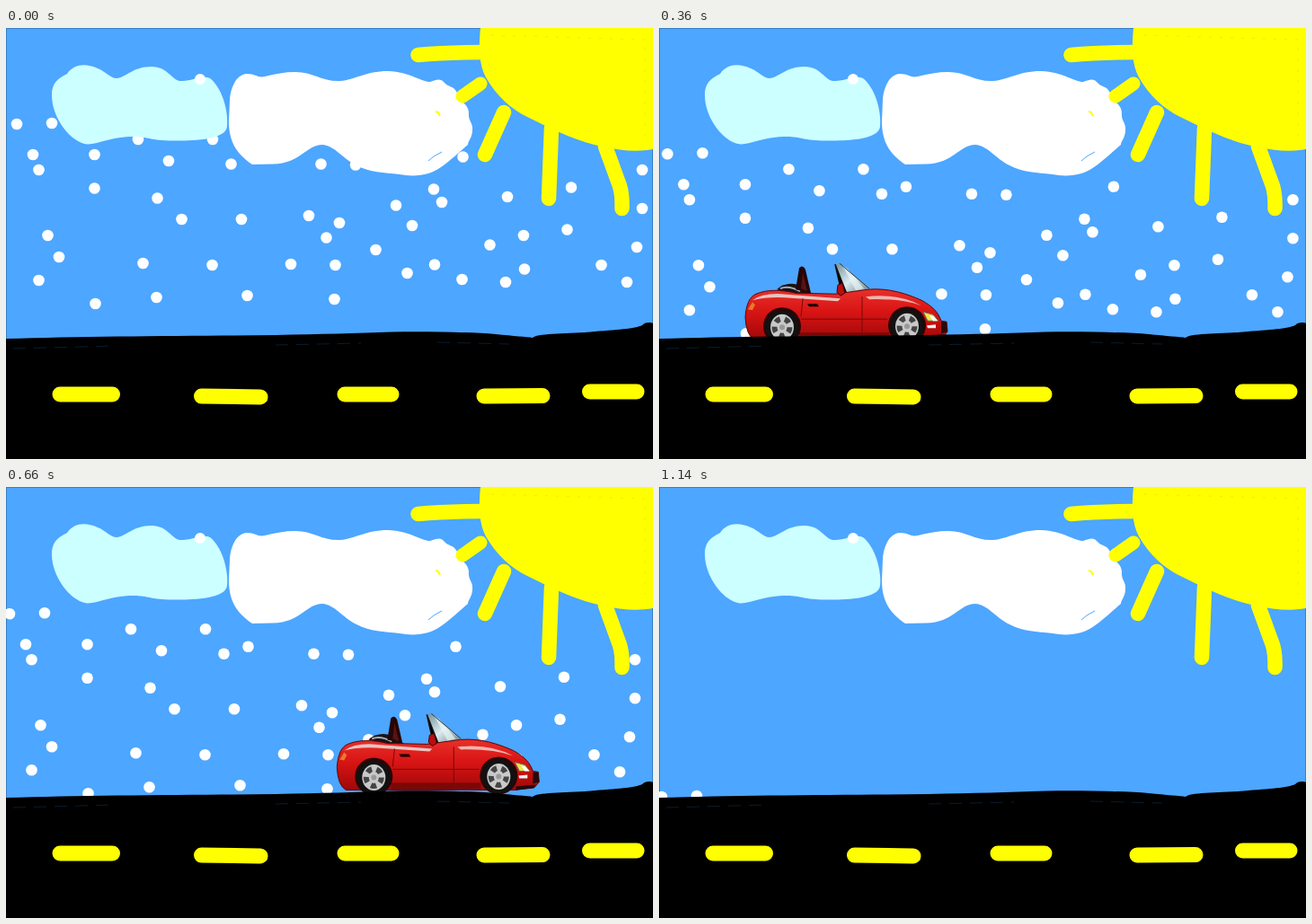
Write an HTML page that moves like this. It is 720 px wide and 480 px high and loops after 1.17 s.

```html
<!DOCTYPE html>
<html lang="en">
<head>
<meta charset="utf-8">
<title>Snowy drive</title>
<style>
html, body { margin: 0; width: 100%; height: 100%; overflow: hidden; background: #000; }
svg { display: block; width: 720px; height: 480px; }
</style>
</head>
<body>
<svg viewBox="0 0 720 480">
  <defs>
    <linearGradient id="paint" x2="0" y2="1">
      <stop offset="0" stop-color="#e8302a"/>
      <stop offset=".45" stop-color="#d81414"/>
      <stop offset="1" stop-color="#a00808"/>
    </linearGradient>
    <linearGradient id="glass" x2="1" y2="1">
      <stop offset="0" stop-color="#6f8f99"/>
      <stop offset=".5" stop-color="#dcecf0"/>
      <stop offset="1" stop-color="#5d7982"/>
    </linearGradient>
    <g id="wheel">
      <circle r="21" fill="#2a0505" cy="-1"/>
      <circle r="18.5" fill="#111"/>
      <ellipse rx="13" ry="14.5" fill="#c9c9c9"/>
      <ellipse rx="8.5" ry="9.5" fill="none" stroke="#444" stroke-width="6" stroke-dasharray="6 5.3"/>
      <circle r="3" fill="#999"/>
    </g>
  </defs>

  <rect width="720" height="480" fill="#4da6ff"/>
  <path d="M0 .5H720M.5 0V346M719.5 0V330" stroke="#3a7fc4"/>
  <g id="snow" fill="#fff"></g>

  <g id="car">
    <path d="M241 286Q250 278 262 280L282 291L268 293Z" fill="#161616"/>
    <path d="M245 285Q254 281 267 288" fill="none" stroke="#aab" stroke-width="2"/>
    <path d="M262 286L266 262Q270 258 273 264L279 290Z" fill="#240606"/>
    <path d="M268 285L270 267L275 288Z" fill="#5a1212"/>
    <path d="M306 258L311 257L344 285L318 291Z" fill="url(#glass)"/>
    <path d="M314 259L320 263L338 285L329 287Z" fill="#e9f5f7" opacity=".7"/>
    <path d="M306 258L319 291L311 280Z" stroke="#111" stroke-width="1.5"/>
    <path d="M311 257L344 285" stroke="#333"/>
    <path d="M206 317C207 302 211 294 218 291C230 286 245 286 262 290L306 291L343 286C366 284 386 291 402 298C415 305 421 312 424 321L430 322L431 333L426 339L405 342H216Q207 337 206 317Z" fill="url(#paint)" stroke="#5c0606"/>
    <path d="M214 298Q225 290 246 291L312 296L309 299L250 295Q230 294 214 298Z" fill="#e8c4c0"/>
    <path d="M340 294Q376 290 402 304Q380 296 344 297Z" fill="#f0b4ae"/>
    <path d="M268 319H364M336 294V338M270 296L268 316" fill="none" stroke="#780808"/>
    <path d="M266 334H366V342H266Z" fill="#7c0707"/>
    <path d="M209 308L214 300L217 303L214 309Z" fill="#e8792a"/>
    <path d="M275 302H286L288 305H277Z" fill="#100"/>
    <path d="M309 281L314 279L317 290L312 293L308 289Z" fill="#b80f0f" stroke="#400"/>
    <path d="M404 311L415 314L421 321L409 321Z" fill="#f2e34a" stroke="#666"/>
    <path d="M411 315L416 316L420 321H415Z" fill="#fff"/>
    <path d="M408 326L418 325V329H409Z" fill="#eee"/>
    <path d="M424 322H430L431 333L424 335ZM405 338L427 336L425 340L405 342Z" fill="#26090b"/>
    <use href="#wheel" x="247" y="328"/>
    <use href="#wheel" x="386" y="327"/>
  </g>

  <path d="M51 75C51 60 59 56 68 51C76 40 88 39 102 45C112 49 116 56 123 56C134 55 141 43 162 43C180 43 184 58 194 59C206 60 218 52 227 56C240 66 248 92 246 110C244 124 212 125.5 190 125.5C160 126 160 121 142 121C118 121 104 129 91 129.5C72 128 51 100 51 75Z" fill="#cff"/>
  <circle cx="216" cy="57" r="6" fill="#fff"/>
  <path d="M249 80C250 66 256 52 268 51C278 51 280 56 288 54C300 51 310 49 322 49C342 49 352 60 372 59C388 58 400 48 425 48C450 49 462 60 472 60C480 57 484 56 488 61C492 66 498 64 502 72C506 84 514 84 515 94C514 104 520 105 519 114C519 122 514 126 514 130C500 142 484 158 470 162C460 165 448 165 438 163C420 161 406 161 390 153C374 145 366 131 352 130C334 130 328 151 297 151.5L274 152C256 140 248 126 248 104Z" fill="#fff"/>
  <path d="M470 148L476 143L485 138" fill="none" stroke="#4da6ff"/>
  <path d="M478 93L481 94L483 98" fill="none" stroke="#ff0" stroke-width="2"/>

  <path d="M528 0C526 20 526 40 534 55C546 76 562 90 580 99C610 114 640 128 664 132C684 137 704 138 720 135V0Z" fill="#ff0"/>
  <path d="M540 8L711 13V120" fill="none" stroke="#cc0" stroke-dasharray="3 9" opacity=".35"/>
  <g fill="none" stroke="#ff0" stroke-width="16.5" stroke-linecap="round">
    <path d="M458.500 30Q490 27 532 27M533 141L554 94M607 112L604 190M667 132L683 176Q686 186 685.500 201"/>
    <path d="M508 76L528 62" stroke-width="15"/>
  </g>

  <path d="M0 346C90 343 200 343 300 342C350 341 390 340 430 338.500C480 338 520 339 545 341C565 343 580 344 586 345C590 340 620 341 650 338.500C680 336 700 335 708 331C712 327 718 328 720 329V480H0Z"/>
  <path d="M8 357L120 354M300 353L395 351M480 350L560 352" stroke="#0a1c2e" stroke-dasharray="14 9"/>
  <path d="M60 408H118.500M217.500 410L283 411M377 408H429M532 410L597 409.500M649.500 405H702" stroke="#ff0" stroke-width="17" stroke-linecap="round"/>
</svg>
<script>
const STEP = 30, LOOP = 1170;
const snow = document.getElementById('snow');
const car = document.getElementById('car');

const flakes = [
  [12,107],[51,106],[30,141],[36.5,158],[98.5,141],[147,124],[230,124],[181,148],[250.5,151.5],
  [277.5,143.5],[350.5,151.5],[389,152.5],[508.5,143.5],[476,179.5],[485,194],[434,197.5],[452,220],
  [371,217],[337,209],[356.5,233.5],[411.5,247],[446.5,273],[477,263.5],[507.5,280],[538.5,241.5],
  [558,188],[576,231],[577,268.5],[556,283],[629,177.5],[624.5,224.5],[662.5,264],[691,283],
  [702,244],[708,201],[708,158],[98.5,178.5],[168.5,189.5],[195.5,213],[262,213],[46.5,231],
  [59,255],[36.5,281],[99.5,307],[152.5,262],[229.5,264],[167.5,300],[268.5,298],[317,263],
  [366.5,264],[365.5,302]
];
snow.innerHTML = flakes.map(([x, y]) => `<circle cx="${x}" cy="${y}" r="6.3"/>`).join('');

// Keys: [step, x, y]
const snowKeys = [[0, 0, 0], [10, -1, 43], [19, -8, -1], [30, -8, 128], [38, -9, 238]];
const carKeys = [[0, -440, 8], [10, -165, 8], [19, 82.5, -4.7], [38, 588, -4]];

function place(el, keys, step) {
  const i = Math.max(1, keys.findIndex(k => k[0] >= step));
  const [a, ax, ay] = keys[i - 1], [b, bx, by] = keys[i];
  const p = (step - a) / (b - a);
  el.setAttribute('transform', `translate(${ax + (bx - ax) * p} ${ay + (by - ay) * p})`);
}

function draw() {
  const step = Math.floor(performance.now() % LOOP / STEP);
  place(snow, snowKeys, step);
  place(car, carKeys, step);
  requestAnimationFrame(draw);
}
draw();
</script>
</body>
</html>
```
